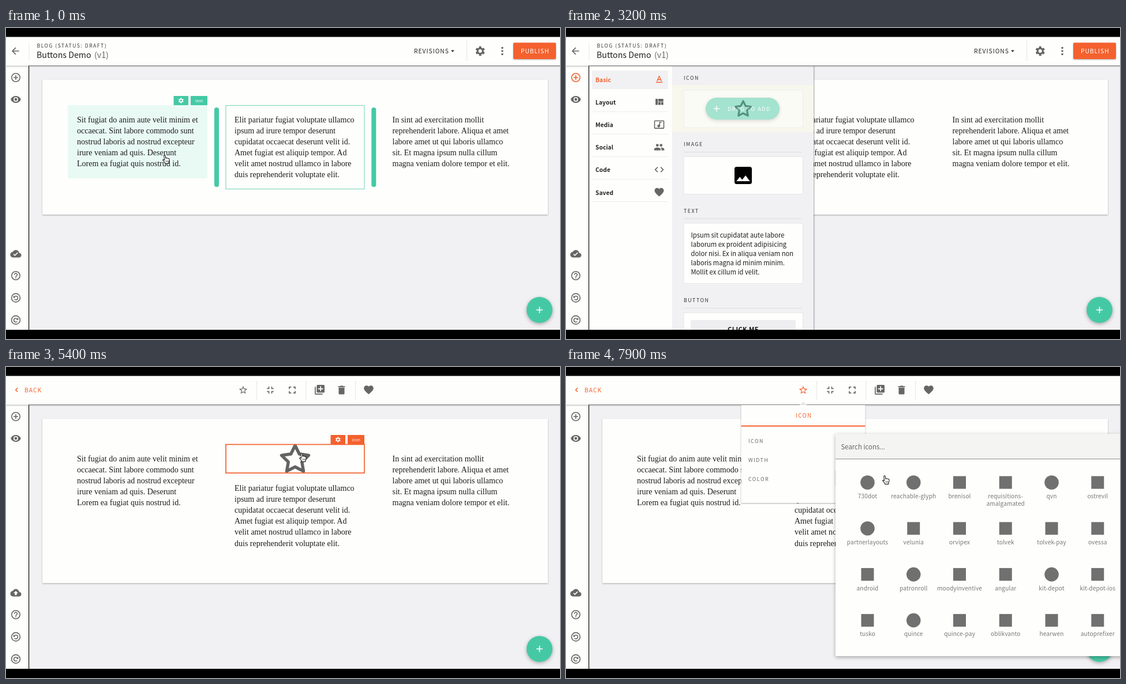
Animation of 960x540 px, one loop 8000 ms. Source, as an HTML page:

```html
<!DOCTYPE html>
<html lang="en">
<head>
<meta charset="utf-8">
<title>Page editor</title>
<style>
  html, body { margin: 0; width: 100%; height: 100%; overflow: hidden; background: #000; }
  svg { display: block; width: 100vw; height: 100vh; }
  text { font-family: "Noto Sans CJK JP", "Noto Sans CJK SC", "Noto Sans", sans-serif; white-space: pre; }
  .serif { font-family: "Liberation Serif", "Times New Roman", serif; }
  .tag { font-family: "Open Sans", sans-serif; }
  .low { filter: drop-shadow(0 1px 1.2px rgba(0,0,0,.32)); }
  .side { filter: drop-shadow(1px 0 1.2px rgba(0,0,0,.38)); }
  .high { filter: drop-shadow(0 2px 3px rgba(0,0,0,.32)); }
</style>
</head>
<body>
<svg id="stage" viewBox="0 0 960 540"></svg>
<script>
const GREEN = '#45c9a5', ORANGE = '#f4612e', GRAY = '#666', PAPER = '#fefefc', BACK = '#f1f1f3', MINT = '#e9faf5';

// Icon outlines on a 24 unit grid
const CIRCLE = 'M12 2a10 10 0 1 0 0 20a10 10 0 1 0 0-20zm0 18a8 8 0 1 1 0-16a8 8 0 1 1 0 16z';
const CLOUD = 'M19.35 10.04C18.67 6.59 15.64 4 12 4 9.11 4 6.6 5.64 5.35 8.04 2.34 8.36 0 10.91 0 14c0 3.31 2.69 6 6 6h13c2.76 0 5-2.24 5-5 0-2.64-2.05-4.78-4.65-4.96z';
const ICONS = {
  back: 'M20 11H7.83l5.59-5.59L12 4l-8 8 8 8 1.41-1.41L7.83 13H20z',
  add: CIRCLE + 'M13 7h-2v4H7v2h4v4h2v-4h4v-2h-4z',
  eye: 'M12 4.5C7 4.5 2.73 7.61 1 12c1.73 4.39 6 7.5 11 7.5s9.27-3.11 11-7.5c-1.73-4.39-6-7.5-11-7.5zM12 17a5 5 0 1 1 0-10a5 5 0 1 1 0 10zm0-8a3 3 0 1 0 0 6a3 3 0 1 0 0-6z',
  done: CLOUD + 'M10 17l-3.5-3.5 1.41-1.41L10 14.17 15.18 9l1.41 1.41z',
  upload: CLOUD + 'M14 13v4h-4v-4H7l5-5 5 5z',
  help: CIRCLE + 'M11 18h2v-2h-2zm1-12c-2.21 0-4 1.79-4 4h2c0-1.1.9-2 2-2s2 .9 2 2c0 2-3 1.75-3 5h2c0-2.25 3-2.5 3-5 0-2.21-1.79-4-4-4z',
  star: 'M22 9.24l-7.19-.62L12 2 9.19 8.63 2 9.24l5.46 4.73L5.82 21 12 17.27 18.18 21l-1.63-7.03zM12 15.4l-3.76 2.27 1-4.28-3.32-2.88 4.38-.38L12 6.1l1.71 4.04 4.38.38-3.32 2.88 1 4.28z',
  shrink: 'M5 16h3v3h2v-5H5zm3-8H5v2h5V5H8zm6 11h2v-3h3v-2h-5zm2-11V5h-2v5h5V8z',
  grow: 'M7 14H5v5h5v-2H7zm-2-4h2V7h3V5H5zm12 7h-3v2h5v-5h-2zM14 5v2h3v3h2V5z',
  copy: 'M4 6H2v14c0 1.1.9 2 2 2h14v-2H4zm16-4H8c-1.1 0-2 .9-2 2v12c0 1.1.9 2 2 2h12c1.1 0 2-.9 2-2V4c0-1.1-.9-2-2-2zm-1 9h-4v4h-2v-4H9V9h4V5h2v4h4z',
  trash: 'M6 19c0 1.1.9 2 2 2h8c1.1 0 2-.9 2-2V7H6zM19 4h-3.5l-1-1h-5l-1 1H5v2h14z',
  heart: 'M12 21.35l-1.45-1.32C5.4 15.36 2 12.28 2 8.5 2 5.42 4.42 3 7.5 3c1.74 0 3.41.81 4.5 2.09C13.09 3.81 14.76 3 16.5 3 19.58 3 22 5.42 22 8.5c0 3.78-3.4 6.86-8.55 11.54z',
  type: 'M5 17v2h14v-2zm4.5-4.2h5l.9 2.2h2.1L12.75 4h-1.5L6.5 15h2.1zM12 5.98L13.87 11h-3.74z',
  quilt: 'M10 18h5v-6h-5zm-6 0h5V5H4zm12 0h5v-6h-5zM10 5v6h11V5z',
  media: 'M21 3H3c-1.1 0-2 .9-2 2v14c0 1.1.9 2 2 2h18c1.1 0 2-.9 2-2V5c0-1.1-.9-2-2-2zm0 16H3V5h18zM8 15c0-1.66 1.34-3 3-3 .35 0 .69.07 1 .18V6h5v2h-3v7c0 1.66-1.35 3-3 3s-3-1.34-3-3z',
  people: 'M16 11a3 3 0 1 0 0-6a3 3 0 1 0 0 6zm-8 0a3 3 0 1 0 0-6a3 3 0 1 0 0 6zm0 2c-2.33 0-7 1.17-7 3.5V19h14v-2.5c0-2.33-4.67-3.5-7-3.5zm8 0l-.97.05c1.16.84 1.97 1.97 1.97 3.45V19h6v-2.5c0-2.33-4.67-3.5-7-3.5z',
  code: 'M9.4 16.6L4.8 12l4.6-4.6L8 6l-6 6 6 6zm5.2 0l4.6-4.6-4.6-4.6L16 6l6 6-6 6z',
  image: 'M21 19V5c0-1.1-.9-2-2-2H5c-1.1 0-2 .9-2 2v14c0 1.1.9 2 2 2h14c1.1 0 2-.9 2-2zM8.5 13.5l2.5 3.01L14.5 12l4.5 6H5z',
  gear: gearPath()
};

function polar(r, deg, c = 12) {
  const a = deg * Math.PI / 180;
  return `${(c + r * Math.cos(a)).toFixed(2)} ${(c + r * Math.sin(a)).toFixed(2)}`;
}
function gearPath() {
  const pts = [];
  for (let d = 30; d < 390; d += 60)
    pts.push(polar(7.3, d - 19), polar(10, d - 14), polar(10, d + 14), polar(7.3, d + 19));
  return `M${pts.join('L')}zM12 8.4a3.6 3.6 0 1 0 0 7.2a3.6 3.6 0 1 0 0-7.2z`;
}

const rect = (x, y, w, h, fill, more = '') =>
  `<rect x="${x}" y="${y}" width="${w}" height="${h}" fill="${fill}" ${more}/>`;
const line = (x1, y1, x2, y2, color = '#e6e6e6', w = 1) =>
  `<path d="M${x1} ${y1}L${x2} ${y2}" stroke="${color}" stroke-width="${w}"/>`;
const text = (s, x, y, size, fill = '#222', ls = 0, more = '') =>
  `<text x="${x}" y="${y}" font-size="${size}" fill="${fill}" letter-spacing="${ls}" ${more}>${s}</text>`;
const icon = (name, x, y, s = .8, fill = GRAY, id = '') =>
  `<path ${id && `id="${id}"`} d="${ICONS[name]}" fill="${fill}" fill-rule="evenodd" transform="translate(${x - 12 * s} ${y - 12 * s}) scale(${s})"/>`;
const group = (id, body, more = '') => `<g id="${id}" ${more}>${body}</g>`;
const MID = 'text-anchor="middle"', BOLD = 'font-weight="600"';

function star(x, y, r, w, color) {
  const pts = [];
  for (let i = 0; i < 10; i++) pts.push(polar(i % 2 ? r / 2 : r, i * 36 - 90, 0));
  return `<path d="M${pts.join('L')}z" transform="translate(${x} ${y})" fill="none" stroke="${color}" stroke-width="${w}" stroke-linejoin="round"/>`;
}
function tag(right, y, label, w, color) {
  const x = right - w;
  return rect(x - 29.5, y, 25.5, 16, color, 'rx="1"') + icon('gear', x - 16.7, y + 8, .46, '#fff') +
    rect(x, y, w, 16, color, 'rx="1"') +
    text(label, x + w / 2, y + 10.8, 7.4, '#fff', 0, `${MID} class="tag"`);
}
const lines = (rows, x, y, step, size, more) =>
  rows.map((s, i) => text(s, x, y + i * step, size, '#1c1c1c', 0, more)).join('');
const serif = (x, rows) => lines(rows, x, 163.5, 19.15, 14, 'class="serif"');

function page() {
  return rect(40, 66, 920, 458, BACK) +
    rect(63, 90, 876, 234, PAPER, 'id="card" class="low"') +
    group('rowHover', rect(67, 106, 868, 253, MINT) +
      rect(365, 118, 272, 229, 'none', 'stroke="#d9efe8"') + tag(934.5, 90, 'row', 27.5, GREEN)) +
    group('colHover', rect(92, 119, 272, 228, MINT, `id="colBox" stroke="${GREEN}" stroke-width="1.6"`) +
      tag(365, 102, 'column', 42, GREEN)) +
    group('textHover', rect(107, 134, 242, 127, MINT) +
      rect(381, 134.5, 240, 145, 'none', 'stroke="#86d9c4" stroke-width="1.2"') + tag(349, 118, 'text', 29, GREEN)) +
    group('bars', [361, 633.3].map(x => rect(x, 138, 8, 138, GREEN, 'rx="4"')).join('')) +
    serif(123, ['Sit fugiat do anim aute velit minim et', 'occaecat. Sint labore commodo sunt',
      'nostrud laboris ad nostrud excepteur', 'irure veniam ad quis. Deserunt', 'Lorem ea fugiat quis nostrud id.']) +
    group('middle', serif(396, ['Elit pariatur fugiat voluptate ullamco', 'ipsum ad irure tempor deserunt',
      'cupidatat occaecat deserunt velit id.', 'Amet fugiat est aliquip tempor. Ad',
      'velit amet nostrud ullamco in labore', 'duis reprehenderit voluptate elit.'])) +
    serif(669.5, ['In sint ad exercitation mollit', 'reprehenderit labore. Aliqua et amet',
      'labore amet ut qui laboris ullamco', 'sit. Et magna ipsum nulla cillum', 'magna veniam dolore tempor et elit.']) +
    group('bigStar', star(501, 161, 24.7, 5.4, '#636363')) +
    group('drop', line(381, 134, 621, 134, GREEN, 3)) +
    ['iconHover', 'iconPicked'].map((id, i) => {
      const c = i ? ORANGE : GREEN;
      return group(id, rect(381, 134.5, 240, 49.5, 'none', `stroke="${c}" stroke-width="1.7"`) + tag(621, 118, 'icon', 29, c));
    }).join('') +
    group('fab', `<circle cx="924.5" cy="489.5" r="22.5" fill="${GREEN}"/>` +
      line(919, 489.5, 930, 489.5, '#fff', 1.6) + line(924.5, 484, 924.5, 495, '#fff', 1.6), 'class="high"');
}

const pill = group('pill', rect(242, 121, 128, 38, GREEN, 'rx="19" class="high"') +
  line(256, 140, 266, 140, '#fff', 1.6) + line(261, 135, 261, 145, '#fff', 1.6) +
  text('DRAG TO ADD', 280, 144, 9.4, '#fff', 1.4));

function panel() {
  const menu = [['Basic', 'type'], ['Layout', 'quilt'], ['Media', 'media'], ['Social', 'people'], ['Code', 'code'], ['Saved', 'heart']];
  const box = (y, h) => rect(204, y + .5, 206.5, h, PAPER, 'stroke="#e7e7e9"');
  const head = (s, y) => text(s, 204, y, 8.8, '#333', 1.5) + line(204, y + 10.5, 408, y + 10.5, '#dcdcde');
  return group('panel', rect(40, 66, 389, 458, PAPER, 'class="side"') + rect(45, 74, 132, 32, BACK) +
    menu.map(([s, name], i) => {
      const y = 90 + i * 39.1, c = i ? GRAY : ORANGE;
      return text(s, 51, y + 4, 10.2, i ? '#222' : ORANGE, .1, BOLD) + icon(name, 161.5, y - .5, .8, c) +
        (i ? line(45, y + 16, 177, y + 16, '#ececec') : '');
    }).join('') +
    rect(184, 66, 245, 458, BACK) + head('ICON', 89.5) +
    rect(184, 99, 245, 82, '#f7f7ee', 'id="itemHover"') +
    group('item', box(107.5, 65) + star(307, 141, 14, 3.2, '#000')) + group('itemPill', pill) +
    head('IMAGE', 205) + box(223, 65) + icon('image', 307, 256, 1.67, '#000') +
    head('TEXT', 320.5) + box(338.5, 104.5) +
    lines(['Ipsum sit cupidatat aute labore', 'laborum ex proident adipisicing', 'dolor nisi. Ex in aliqua veniam non',
      'laboris magna id minim minim.', 'Mollit ex cillum id velit.'], 216.5, 364, 16, 11.2) +
    head('BUTTON', 476) + box(494, 60) + rect(216, 507, 182, 40, '#eeeef0', 'rx="3"') +
    text('CLICK ME', 307, 528, 11, '#111', .4, `${MID} ${BOLD}`));
}

function sidebar() {
  const turn = (y, sx) => `<g transform="translate(17 ${y}) scale(${sx} 1)" fill="none" stroke="${GRAY}" stroke-width="1.6">
    <circle r="7.4"/><path d="M-2.6 -1.6A3.3 3.3 0 1 1 -2.4 2.4"/><path d="M-4.4 -4V0H-.6z" fill="${GRAY}" stroke="none"/></g>`;
  return rect(0, 60, 39, 470, PAPER, 'class="side"') + icon('add', 17, 86, .8, GRAY, 'plus') + icon('eye', 17, 124) +
    icon('done', 17, 392, .8, GRAY, 'saved') + icon('upload', 17, 392, .8, GRAY, 'saving') +
    icon('help', 17, 430) + turn(468.5, 1) + turn(507, -1);
}

function header() {
  const dots = [34.5, 40, 45.5].map(y => `<circle cx="860" cy="${y}" r="1.8" fill="${GRAY}"/>`).join('');
  return rect(0, 10, 960, 55.5, PAPER, 'class="low"') +
    group('pageBar', icon('back', 16.3, 40) + line(40, 26, 40, 56) +
      text('BLOG (STATUS: DRAFT)', 53.5, 34, 8.5, '#333', 1.55) + text('Buttons Demo', 53, 52, 14.2) +
      text('(v1)', 153, 52, 14.2, GRAY) + text('REVISIONS', 707, 44, 10.3, '#222', 1) +
      '<path d="M771 38.5h6l-3 3.6z" fill="#333"/>' + line(798.5, 22, 798.5, 57) + icon('gear', 821.7, 40, .84) + dots +
      rect(879, 25.5, 74, 28.5, ORANGE, 'rx="2" class="low"') + text('PUBLISH', 892, 44, 10.3, '#fff', .95)) +
    group('toolBar', `<path d="M20.2 36.2L16.8 39.7L20.2 43.2" fill="none" stroke="${ORANGE}" stroke-width="1.5"/>` +
      text('BACK', 32, 44, 10.3, ORANGE, 1) + icon('star', 411, 40, .72, GRAY, 'toolStar') +
      icon('shrink', 458, 40, .84) + icon('grow', 496, 40, .84) + icon('copy', 543.5, 39.5, .85) +
      icon('trash', 581.5, 40, .84) + icon('heart', 628.5, 39.7, .83) +
      [434.5, 519.5, 605.5].map(x => line(x, 24, x, 57)).join(''));
}

function popup() {
  const label = (s, y) => text(s, 316, y, 8.8, GRAY, 1.5);
  return group('popup', '<path d="M404.5 66L411 60L417.5 66z" fill="#e8e8e8"/>' + rect(303.5, 66, 215, 170, PAPER, 'class="low"') +
    rect(303.5, 66, 215, 36, '#fde9e3', 'id="tab"') + rect(303.5, 101.5, 215, 2, ORANGE) +
    text('ICON', 398, 88.3, 9.8, ORANGE, 1.3) + label('ICON', 131.5) + label('WIDTH', 164.5) + label('COLOR', 198) +
    star(487, 129.5, 12.2, 2.6, GRAY) + rect(467, 149, 39.5, 23, '#ebebeb') + line(467, 172.5, 506.5, 172.5, '#555') +
    text('50', 477, 165, 11.7) + rect(466.5, 180.5, 40.5, 25, PAPER, 'stroke="#e4e4e4"'));
}

function picker() {
  const names = ['730dot', 'reachable-glyph', 'brenisol', 'requisitions-|amalgamated', 'qvn', 'ostrevil',
    'partnerlayouts', 'velunia', 'orvipex', 'tolvek', 'tolvek-pay', 'ovessa',
    'android', 'patronroll', 'moodyinventive', 'angular', 'kit-depot', 'kit-depot-ios',
    'tusko', 'quince', 'quince-pay', 'oblikvanto', 'hearwen', 'autoprefixer'];
  const round = [0, 1, 4, 6, 13, 16, 19];
  return group('picker', rect(467, 116, 520, 386, PAPER, 'class="high"') + rect(467, 116, 520, 43.5, '#f4f4f2') +
    line(467, 159.7, 960, 159.7, '#8a8a8a') + text('Search icons...', 476.5, 142.5, 11.4, GRAY) +
    names.map((name, i) => {
      const x = 522.5 + i % 6 * 79.75, y = 200.5 + Math.floor(i / 6) * 79.8;
      const mark = round.includes(i) ? `<circle cx="${x}" cy="${y}" r="12.3" fill="#707070"/>` : rect(x - 11, y - 11, 22, 22, '#707070');
      return mark + name.split('|').map((s, k) => text(s, x, y + 27.5 + k * 13, 10.1, '#777', .12, MID)).join('');
    }).join(''));
}

function cursor() {
  return group('cursor',
    group('arrow', '<path d="M0 0V11.2L2.6 8.8L4.4 13L6.4 12.1L4.6 8H8z" fill="#000" stroke="#fff" stroke-width=".8"/>') +
    group('hand', '<path d="M-1.2 .8C-1.2 -.6 1 -.6 1.2 .8L1.8 5L3.6 4.6L5.2 5.2L7 5.6C8.4 6.4 8.2 9 7.2 11.4L6.8 14.4H.8L-.6 11.6L-3.4 8.4C-3.4 7.2 -2 7 -.4 8.4z" fill="#fff" stroke="#222" stroke-width="1.1"/><path d="M2.2 9v3M4 9v3M5.7 9v3" stroke="#222" stroke-width=".6"/>') +
    group('beam', '<path d="M-2.4 -6.5Q0 -6.5 0 -5Q0 -6.5 2.4 -6.5M0 -5V5M-2.4 6.5Q0 6.5 0 5Q0 6.5 2.4 6.5M-1.5 2.5h3" fill="none" stroke="#222" stroke-width="1.1"/>'));
}

document.getElementById('stage').innerHTML = page() + panel() + sidebar() + header() + popup() + picker() +
  group('ghost', pill.replace('id="pill"', '')) + cursor() + rect(0, 0, 960, 15.5, '#000') + rect(0, 524, 960, 16, '#000');

// Pointer path: time, x, y
const PATH = [[0, 275, 221], [300, 205, 190], [600, 88, 124], [800, 61, 108], [1200, 17, 84], [1600, 17, 84], [2400, 310, 138],
  [3300, 306, 140], [4100, 501, 136], [4600, 501, 136], [4900, 517.5, 140.5], [5200, 512, 150], [5400, 512, 150], [5800, 481, 86],
  [6200, 411, 39], [6600, 411, 39], [7000, 502, 153], [7200, 488, 130], [7500, 488, 130], [7900, 552, 189]];

const $ = id => document.getElementById(id);
const show = (id, on) => $(id).setAttribute('opacity', Number(on));
const ramp = (t, a, b) => {
  const k = Math.min(1, Math.max(0, (t - a) / (b - a)));
  return k * k * (3 - 2 * k);
};
function pointer(t) {
  const i = PATH.findIndex(p => p[0] > t);
  if (i < 0) return PATH[PATH.length - 1].slice(1);
  const [t0, x0, y0] = PATH[i - 1], [t1, x1, y1] = PATH[i], k = ramp(t, t0, t1);
  return [x0 + (x1 - x0) * k, y0 + (y1 - y0) * k];
}

function draw(t) {
  const within = (a, b) => t >= a && t < b;
  const [x, y] = pointer(t), dropped = t >= 4500, grow = dropped ? 51.3 : 0;

  $('card').setAttribute('height', 234 + grow);
  $('colBox').setAttribute('height', 177 + grow);
  $('middle').setAttribute('transform', `translate(0 ${grow})`);
  for (const bar of $('bars').children) bar.setAttribute('height', 138 + grow);
  show('bigStar', dropped);
  show('textHover', t < 450);
  show('colHover', within(450, 600) || within(4700, 5000));
  show('bars', t < 600 || within(4600, 5100));
  show('rowHover', within(5600, 6000));
  show('drop', within(3900, 4500));
  show('iconHover', within(5000, 5300));
  show('iconPicked', t >= 5300);

  const open = ramp(t, 1300, 1600) - ramp(t, 3400, 3700);
  $('panel').setAttribute('transform', `translate(${-392 * (1 - open)} 0)`);
  $('plus').setAttribute('fill', within(1200, 3500) ? ORANGE : GRAY);
  const dragging = t >= 2900;
  show('itemHover', t >= 2200);
  show('item', t < 2200 ? 1 : .6);
  show('itemPill', t < 2200 ? 0 : dragging ? .47 : 1);
  show('ghost', within(3300, 4500) ? .5 : 0);
  $('ghost').setAttribute('transform', `translate(${x - 306} ${y - 140})`);

  show('pageBar', t < 5400);
  show('toolBar', t >= 5400);
  $('toolStar').setAttribute('fill', t >= 6200 ? ORANGE : GRAY);
  show('saving', within(5400, 6500));
  show('saved', !within(5400, 6500));

  const pop = ramp(t, 6300, 6600);
  show('popup', pop);
  $('popup').setAttribute('transform', `translate(0 ${-8 * (1 - pop)})`);
  show('tab', t < 7400);
  const pick = ramp(t, 7500, 7800), s = .8 + .2 * pick;
  show('picker', pick);
  $('picker').setAttribute('transform', `translate(${467 * (1 - s)} ${116 * (1 - s)}) scale(${s})`);

  const beam = within(6900, 7100);
  const hand = t < 500 || within(1100, 1600) || within(2200, 2900) || within(5100, 5500) || within(6100, 6700) || t >= 7100;
  show('cursor', !within(2900, 3300));
  show('hand', hand);
  show('beam', beam);
  show('arrow', !hand && !beam);
  $('cursor').setAttribute('transform', `translate(${x} ${y})`);
}

// The picture advances ten times a second
function tick() {
  draw(Math.floor(performance.now() % 8000 / 100) * 100);
  requestAnimationFrame(tick);
}
tick();
</script>
</body>
</html>
```
